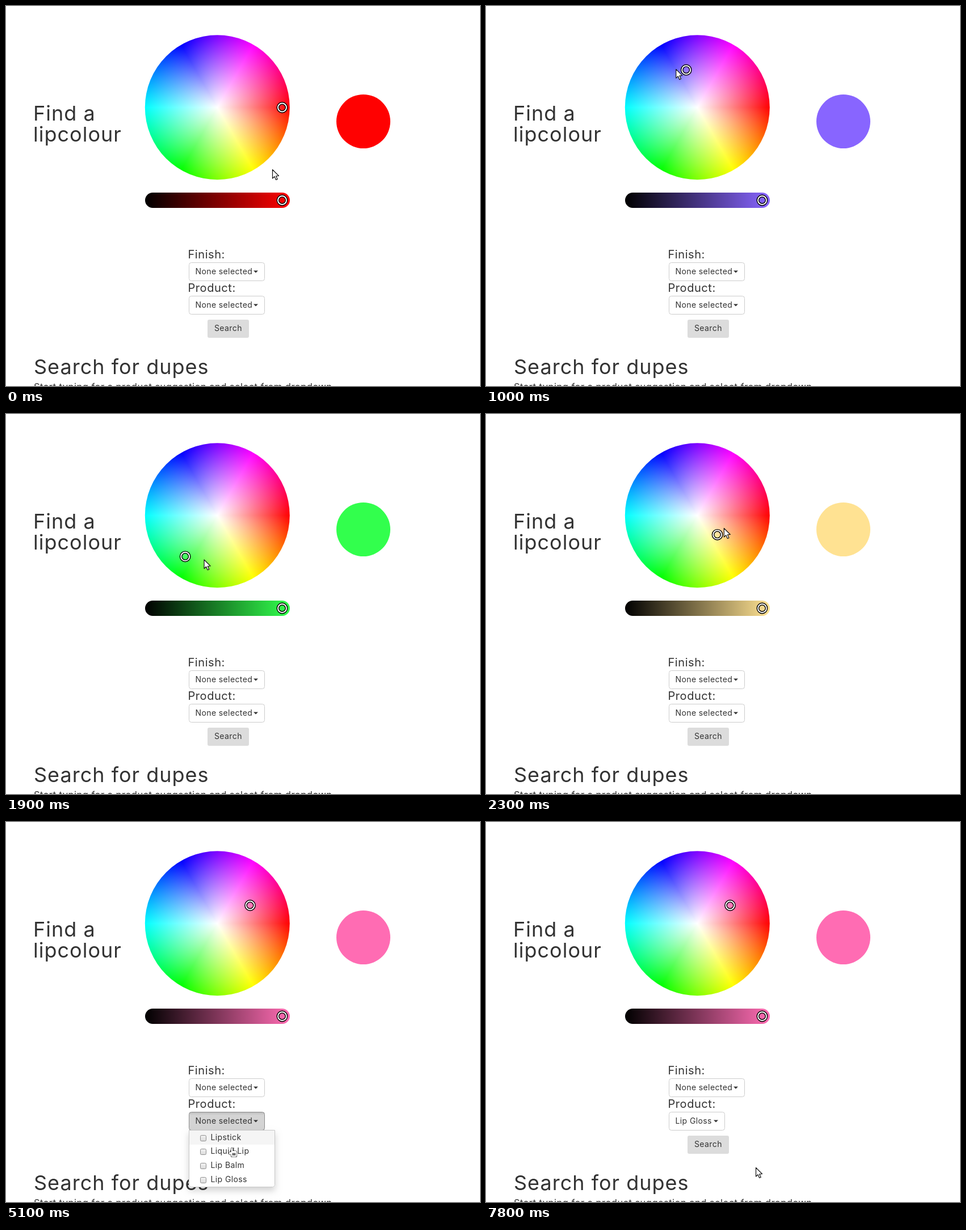
An HTML page with a canvas that plays this animation: 835x670 px, repeating every 8 s.

```html
<!DOCTYPE html>
<html lang="en">
<head>
<meta charset="utf-8">
<title>Lip colour finder</title>
<style>
  html, body { margin: 0; width: 100%; height: 100%; overflow: hidden; background: #fff; }
  canvas { display: block; }
</style>
</head>
<body>
<canvas id="stage" width="835" height="670"></canvas>
<script>
const ctx = document.getElementById('stage').getContext('2d');
const LOOP = 8000, STEP = 100;
const TEXT = '#333';
const WHEEL = { x: 372.3, y: 178.8, r: 127.5, reach: 114.5 };
const MENU = { x: 322, y: 543, w: 152, h: 101, row: 24.8 };
const ITEMS = ['Lipstick', 'Liquid Lip', 'Lip Balm', 'Lip Gloss'];
const AT = { drag: 600, drop: 2500, recolor: 3400, hover: 4100, open: 4500, pick: 6900, leave: 7500, close: 7800 };

// The drag sweeps round the wheel: time, angle in degrees, radius.
const SWEEP = [
  [600, -15, 105], [1000, -106.5, 69], [1500, -170.7, 112],
  [1900, -232, 92], [2300, -316, 49], [2500, -353, 54]
];

// Resting places of the free pointer: time, x, y.
const RESTS = [
  [0, 469, 288], [200, 481, 186], [400, 480, 157], [2500, 430, 180], [3400, 430, 145],
  [3600, 452, 270], [3900, 409, 556], [4100, 409, 523], [5100, 392, 574],
  [5500, 397, 622], [6200, 432, 638], [7500, 503, 613], [7800, 475, 609]
];

function hsv(h, s) {
  const channel = n => {
    const k = (n + h / 60) % 6;
    return Math.round(255 * (1 - s * Math.max(0, Math.min(k, 4 - k, 1))));
  };
  return `rgb(${channel(5)},${channel(3)},${channel(1)})`;
}

function text(str, x, y, size, color = TEXT) {
  ctx.font = `${size}px Inter, "Open Sans", sans-serif`;
  ctx.letterSpacing = size * .028 + 'px';
  ctx.fillStyle = color;
  ctx.fillText(str, x, y);
}

function disc(x, y, r, fill) {
  ctx.beginPath();
  ctx.arc(x, y, r, 0, Math.PI * 2);
  ctx.fillStyle = fill;
  ctx.fill();
}

function box(x, y, w, h, r, fill, stroke) {
  ctx.beginPath();
  ctx.roundRect(x, y, w, h, r);
  ctx.fillStyle = fill;
  ctx.fill();
  if (!stroke) return;
  ctx.lineWidth = 1;
  ctx.strokeStyle = stroke;
  ctx.stroke();
}

function gradient(x0, y0, x1, y1, from, to) {
  const shade = ctx.createLinearGradient(x0, y0, x1, y1);
  shade.addColorStop(0, from);
  shade.addColorStop(1, to);
  return shade;
}

function handle(x, y) {
  ctx.beginPath();
  ctx.arc(x, y, 7.5, 0, Math.PI * 2);
  for (const [color, width] of [['#000', 4.8], ['#fff', 2]]) {
    ctx.strokeStyle = color;
    ctx.lineWidth = width;
    ctx.stroke();
  }
}

function wheel() {
  const { x, y, r } = WHEEL;
  const hues = ctx.createConicGradient(0, x, y);
  for (let i = 0; i <= 6; i++) hues.addColorStop(i / 6, hsv(i * 60, 1));
  disc(x, y, r, hues);
  const fade = ctx.createRadialGradient(x, y, 0, x, y, r);
  fade.addColorStop(0, 'rgba(255,255,255,1)');
  fade.addColorStop(1, 'rgba(255,255,255,0)');
  disc(x, y, r, fade);
}

function slider(color) {
  box(245, 329, 255, 27, 13.5, gradient(245, 0, 500, 0, '#000', color));
  handle(486.5, 342.5);
}

function dropdown(label, y, width, state = 'idle') {
  const [fill, stroke] = {
    idle: ['#fff', '#ccc'], hover: ['#e6e6e6', '#adadad'], open: ['#d4d4d4', '#8c8c8c']
  }[state];
  box(322.5, y + .5, width - 1, 32, 4, fill, stroke);
  if (state === 'open') {
    const inset = gradient(0, y, 0, y + 6, 'rgba(0,0,0,.13)', 'rgba(0,0,0,0)');
    box(323, y + 1, width - 2, 6, [3, 3, 0, 0], inset);
  }
  text(label, 333.5, y + 20.5, 14);
  const caret = 322 + width - 20;
  ctx.beginPath();
  ctx.moveTo(caret, y + 14.5);
  ctx.lineTo(caret + 8, y + 14.5);
  ctx.lineTo(caret + 4, y + 18.5);
  ctx.fill();
}

function checkbox(x, y, checked) {
  box(x + .5, y + .5, 10, 10, 2, gradient(0, y, 0, y + 11, '#f4f4f4', '#d9d9d9'), '#8e8e8e');
  if (!checked) return;
  ctx.beginPath();
  ctx.moveTo(x + 2.5, y + 5.5);
  ctx.lineTo(x + 4.8, y + 8);
  ctx.lineTo(x + 9, y + 2);
  ctx.strokeStyle = '#444';
  ctx.lineWidth = 2;
  ctx.stroke();
}

function menu(highlight, picked) {
  const { x, y, w, h, row } = MENU;
  ctx.save();
  ctx.shadowColor = 'rgba(0,0,0,.175)';
  ctx.shadowBlur = 12;
  ctx.shadowOffsetY = 6;
  box(x, y, w, h, [0, 0, 4, 4], '#fff');
  ctx.restore();
  box(x + .5, y + .5, w - 1, h - 1, [0, 0, 4, 4], '#fff', '#c8c8c8');
  ITEMS.forEach((name, i) => {
    const top = y + 1 + i * row;
    const active = picked && i === highlight;
    if (i === highlight) box(x + 1, top, w - 2, row, 0, active ? '#337ab7' : '#f5f5f5');
    checkbox(x + 20, Math.round(top + 7.6), active);
    text(name, x + 38.5, top + 16.5, 14, active ? '#fff' : TEXT);
  });
}

function arrow(x, y) {
  ctx.save();
  ctx.translate(x + .5, y + .5);
  ctx.fill(new Path2D('M0 0V15.5L3.5 12.2 6.1 18 8.7 16.9 6.2 11.3 11 11Z'));
  ctx.stroke(new Path2D('M0 0V15.5L3.5 12.2 6.1 18 8.7 16.9 6.2 11.3 11 11Z'));
  ctx.restore();
}

function hand(x, y) {
  const outline = new Path2D();
  outline.roundRect(x + 4.5, y + .5, 3, 12, 1.5);
  outline.roundRect(x + .5, y + 8, 6, 4, 2);
  outline.roundRect(x + 4.5, y + 6, 10, 10.5, 2);
  ctx.stroke(outline);
  ctx.fill(outline);
  for (let i = 0; i < 3; i++) ctx.strokeRect(x + 7.5 + 2 * i, y + 10, 0, 3.5);
}

function pointer([x, y], overMenu) {
  ctx.fillStyle = '#fff';
  ctx.strokeStyle = '#111';
  ctx.lineWidth = 1.2;
  ctx.lineJoin = 'round';
  (overMenu ? hand : arrow)(x, y);
}

function handleAt(t) {
  if (t < AT.drag) return [486.5, 179];
  if (t >= AT.recolor) return [430, 147];
  const now = Math.min(t, AT.drop);
  const next = SWEEP.findIndex(([time], i) => i && time >= now);
  const [t0, a0, r0] = SWEEP[next - 1], [t1, a1, r1] = SWEEP[next];
  const k = (now - t0) / (t1 - t0);
  const angle = (a0 + (a1 - a0) * k) * Math.PI / 180;
  const radius = r0 + (r1 - r0) * k;
  return [WHEEL.x + radius * Math.cos(angle), WHEEL.y + radius * Math.sin(angle)];
}

function pointerAt(t) {
  // While dragging, the pointer runs one step ahead of the handle.
  if (t >= AT.drag && t < AT.drop) return handleAt(t + STEP);
  return RESTS.findLast(([time]) => time <= t).slice(1);
}

function draw(time) {
  const t = Math.floor(time / STEP) * STEP;
  const [hx, hy] = handleAt(t);
  const dx = hx - WHEEL.x, dy = hy - WHEEL.y;
  const hue = (Math.atan2(dy, dx) * 180 / Math.PI + 360) % 360;
  const color = hsv(hue, Math.min(1, Math.hypot(dx, dy) / WHEEL.reach));

  ctx.fillStyle = '#fff';
  ctx.fillRect(0, 0, 835, 670);
  text('Find a', 48, 202, 36);
  text('lipcolour', 48, 239, 36);
  text('Search for dupes', 49, 649, 36);
  text('Start typing for a product suggestion and select from dropdown', 49, 677, 16.5);

  wheel();
  handle(hx, hy);
  slider(color);
  disc(629.5, 203.5, 47.5, color);

  const open = t >= AT.open && t < AT.close;
  const hover = t >= AT.hover && t < AT.open;
  const picked = t >= AT.pick;
  text('Finish:', 320.5, 444.5, 20);
  dropdown('None selected', 452, 134);
  text('Product:', 320.5, 503.5, 20);
  dropdown(picked ? 'Lip Gloss' : 'None selected', 511, picked ? 99 : 134,
    open ? 'open' : hover ? 'hover' : 'idle');
  box(355, 553, 73, 32, 3, '#dcdcdc');
  text('Search', 367, 573, 14);

  if (open) menu(t < 5100 ? -1 : t < 5500 ? 0 : 3, picked);
  pointer(pointerAt(t), t >= AT.hover && t < AT.leave);
}

function tick() {
  draw(performance.now() % LOOP);
  requestAnimationFrame(tick);
}
tick();
</script>
</body>
</html>
```
